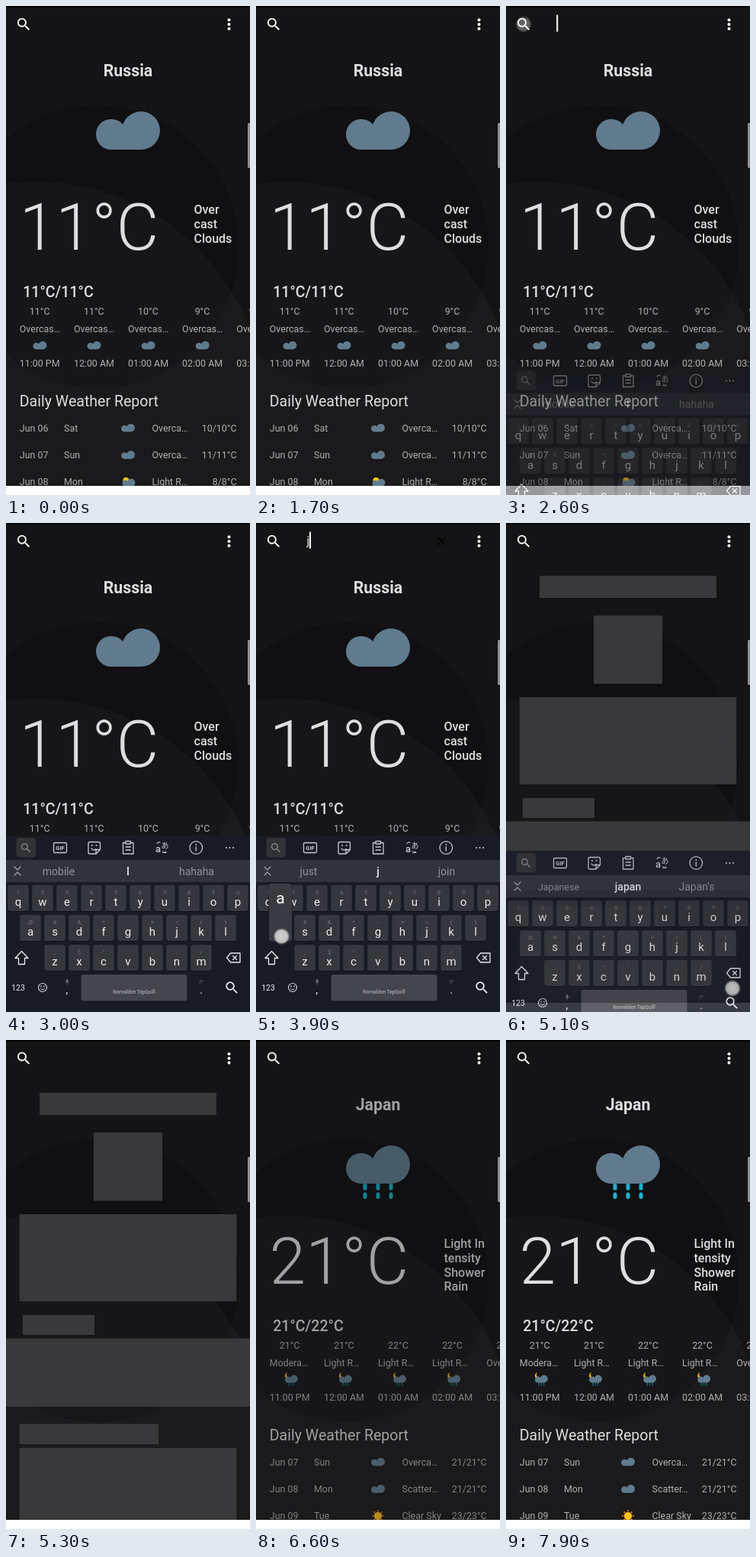
An HTML page that plays this animation: 320x640 px, repeating every 8000 ms.

```html
<!DOCTYPE html>
<html lang="en">
<head>
<meta charset="utf-8">
<title>Weather search</title>
<style>
  html, body { margin: 0; width: 100%; height: 100%; overflow: hidden; background: #141316; }
  svg { display: block; width: 320px; height: 640px; font-family: Roboto, "Noto Sans CJK JP", sans-serif; }
  text { white-space: pre; }
</style>
</head>
<body>
<svg id="stage" viewBox="0 0 320 640"></svg>
<script>
const LOOP = 8000, STEP = 100;
const stage = document.getElementById('stage');

// Markup helpers
const text = (x, y, s, size, fill, weight = 400, anchor = 'start', extra = '') =>
  `<text x="${x}" y="${y}" font-size="${size}" fill="${fill}" font-weight="${weight}" text-anchor="${anchor}" ${extra}>${s}</text>`;
const rect = (x, y, w, h, fill, r = 0) =>
  `<rect x="${x}" y="${y}" width="${w}" height="${h}" rx="${r}" fill="${fill}"/>`;
const circle = (x, y, r, fill, extra = '') => `<circle cx="${x}" cy="${y}" r="${r}" fill="${fill}" ${extra}/>`;
const line = (d, color, width = 1.3) =>
  `<path d="${d}" fill="none" stroke="${color}" stroke-width="${width}" stroke-linecap="round" stroke-linejoin="round"/>`;
const group = (id, body, extra = '') => `<g id="${id}" ${extra}>${body}</g>`;
const place = (x, y, s, body) => `<g transform="translate(${x} ${y}) scale(${s})">${body}</g>`;

// Weather icons, drawn around their centre at large size
const cloudShape = circle(-22, 5, 20, '#607b8d') + circle(17, 0, 25, '#607b8d') + rect(-22, -7, 39, 32, '#607b8d');
const drops = [-17, 0, 17].map(x =>
  rect(x - 2.5, 25, 5, 8.5, '#18b0ca', 1.5) + rect(x - 2.5, 36.5, 5, 8.5, '#18b0ca', 2.2)).join('');
const moonShape = '<path d="M-26-42a22 22 0 1 0 22 36a22 22 0 0 1-22-36z" fill="#fdb813"/>';
const rays = Array.from({ length: 8 }, (_, i) =>
  `<path d="M-7-28L0-41L7-28z" fill="#f4751f" transform="rotate(${i * 45})"/>`).join('');
const icons = {
  cloud: (x, y) => place(x, y, 0.214, cloudShape),
  nightRain: (x, y) => place(x + 2, y - 0.5, 0.2, moonShape + cloudShape + drops),
  sunRain: (x, y) => place(x + 1, y + 1, 0.2, circle(-18, -14, 20, '#fdc51b') + cloudShape + drops),
  sun: (x, y) => place(x, y, 0.205, rays + circle(0, 0, 25, '#fdc51b'))
};

const searchIcon = (x, y, s, fill) => place(x, y, s,
  `<path transform="translate(-11.75 -11.75)" fill="${fill}" d="M15.5 14h-.79l-.28-.27A6.47 6.47 0 0 0 16 9.5 6.5 6.5 0 1 0 9.5 16c1.61 0 3.09-.59 4.23-1.57l.27.28v.79l5 4.99L20.49 19l-4.99-5zm-6 0C7.01 14 5 11.99 5 9.5S7.01 5 9.5 5 14 7.01 14 9.5 11.99 14 9.5 14z"/>`);

function page(id, p) {
  const soft = '#b0b0b2', bright = '#dedee0', small = 12.44;
  let out = text(160, 92, p.name, 21.33, bright, 700, 'middle');
  out += place(160, 163, 1, cloudShape + (p.rain ? drops : ''));
  out += text(17.8, 318.5, p.temp, 85.33, bright, 300);
  p.sky.forEach((s, i) => out += text(246.5, 272 + i * 18.75, s, 16, bright, 500));
  out += text(22.2, 380.5, p.range, 19.56, bright, 500);
  p.hours.forEach(([temp, sky, time], i) => {
    const x = 17.8 + i * 71.1;
    out += text(x + 26.4, 404, temp, small, soft, 400, 'middle') + text(x, 426.5, sky, small, soft)
      + icons[p.hourIcon](x + 26.6, 444) + text(x, 472, time, small, soft);
  });
  out += text(17.8, 523.5, 'Daily Weather Report', 19.56, bright);
  p.days.forEach(([date, day, icon, sky, temp], i) => {
    const y = 556.5 + i * 35.4;
    out += text(17.8, y, date, small, soft) + text(76, y, day, small, soft) + icons[icon](160, y - 4.5)
      + text(191.5, y, sky, small, soft) + text(302.5, y, temp, small, soft, 400, 'end');
  });
  return group(id, out);
}

const times = ['11:00 PM', '12:00 AM', '01:00 AM', '02:00 AM', '03:00 AM'];
const hours = (temps, skies) => times.map((time, i) => [temps[i] + '°C', skies[i], time]);

const russia = {
  name: 'Russia', temp: '11°C', range: '11°C/11°C', sky: ['Over', 'cast', 'Clouds'], hourIcon: 'cloud',
  hours: hours([11, 11, 10, 9, 9], Array(5).fill('Overcas…')),
  days: [['Jun 06', 'Sat', 'cloud', 'Overca…', '10/10°C'],
         ['Jun 07', 'Sun', 'cloud', 'Overca…', '11/11°C'],
         ['Jun 08', 'Mon', 'sunRain', 'Light R…', '8/8°C']]
};
const japan = {
  name: 'Japan', temp: '21°C', range: '21°C/22°C', sky: ['Light In', 'tensity', 'Shower', 'Rain'],
  rain: true, hourIcon: 'nightRain',
  hours: hours([21, 21, 22, 22, 22], ['Modera…', 'Light R…', 'Light R…', 'Light R…', 'Overcas…']),
  days: [['Jun 07', 'Sun', 'cloud', 'Overca…', '21/21°C'],
         ['Jun 08', 'Mon', 'cloud', 'Scatter…', '21/21°C'],
         ['Jun 09', 'Tue', 'sun', 'Clear Sky', '23/23°C']]
};

const skeleton = [[44, 69, 232, 29], [115, 121, 90, 89.5], [17.8, 228, 284.5, 114], [22, 360, 94, 26],
  [0, 390.5, 320, 89.5], [17.8, 502.5, 182.4, 26.5], [17.8, 534, 284.5, 95]]
  .map(r => rect(...r, '#39383a')).join('');

// Keyboard
const keyPos = {};
function keyboard() {
  const white = '#ececee', dim = '#707278', ink = '#c6c8cc';
  let out = rect(0, 409, 320, 400, '#181b24') + rect(0, 441, 320, 29, '#30333b');

  out += rect(13.5, 412, 25.5, 25.5, '#303236', 4) + searchIcon(26, 425, 0.7, '#85878b');
  out += line('M64 418.5h14a1.5 1.5 0 0 1 1.5 1.5v10a1.5 1.5 0 0 1-1.5 1.5h-14a1.5 1.5 0 0 1-1.5-1.5v-10a1.5 1.5 0 0 1 1.5-1.5z', ink)
    + text(71, 428, 'GIF', 7.5, ink, 700, 'middle');
  out += line('M110 417.5h11.5a2 2 0 0 1 2 2v8l-5.5 5.5h-8a2 2 0 0 1-2-2v-11.5a2 2 0 0 1 2-2zM118 433v-3.500a2 2 0 0 1 2-2h3.500M112 426q3.500 4 6 .5', ink)
    + circle(113, 422, 1, ink) + circle(118.5, 422, 1, ink);
  out += line('M156 418.500h-2.500v14.500h13.500v-14.500h-2.500M157 416.500h6.500v3.500h-6.500zM157 424h6.500M157 428h6.500', ink);
  out += text(199.500, 431, 'a', 13, ink, 500, 'middle') + text(208.500, 426, 'あ', 10, ink, 500, 'middle')
    + line('M198 419.500q1-2 4-1.500M206 431.500h4l-1.500-1.500M206 429.500v2', ink, 1.1);
  out += `<circle cx="249.300" cy="425" r="8.300" fill="none" stroke="${ink}" stroke-width="1.300"/>`
    + line('M249.300 424v5', ink, 1.4) + circle(249.3, 421, 1, ink);
  out += [289, 293.5, 298].map(x => circle(x, 425, 1.1, ink)).join('');

  out += line('M11 450l4 4l4-4M11 461l4-4l4 4', '#a0a2a7', 1.2);
  out += group('hints', [69, 160, 250].map((x, i) =>
    text(x, 460.5, '', 14, i === 1 ? white : '#8f9196', i === 1 ? 500 : 400, 'middle')).join(''));

  [['qwertyuiop', '1234567890', 16], ['asdfghjkl', '@#&*-+=()', 32], ['zxcvbnm', '_$"\':;/', 64]]
    .forEach(([letters, marks, x0], row) => {
      const y = 474 + row * 39;
      [...letters].forEach((c, i) => {
        const x = x0 + i * 32;
        keyPos[c] = [x, y];
        out += rect(x - 13.8, y + 1, 27.6, 34, '#0e1016', 3) + rect(x - 13.8, y, 27.6, 34, '#36373d', 3)
          + text(x, y + 11.5, marks[i].replace('&', '&amp;'), 8, dim, 400, 'middle')
          + text(x, y + 27, c, 15, white, 400, 'middle');
      });
    });
  out += line('M20.500 560.500l8.500 9h-4.500v8h-8v-8h-4.500z', white, 1.3);
  out += line('M294.500 563h12.500v12h-12.500l-5-6zM297.500 566.500l5 5M302.500 566.500l-5 5', white, 1.3);

  out += text(16, 612, '123', 10.5, white, 400, 'middle');
  out += '<circle cx="48" cy="608" r="5.500" fill="none" stroke="#d0d1d4" stroke-width="1.200"/>'
    + circle(46, 606.5, 0.9, '#d0d1d4') + circle(50, 606.5, 0.9, '#d0d1d4') + line('M45.500 609.500q2.500 3 5 0', '#d0d1d4', 1);
  out += rect(79, 597, 2.4, 4.5, dim, 1.2) + line('M77.800 600.500q2.400 4 4.800 0M80.200 602.500v2', dim, 0.7)
    + text(80, 616, ',', 14, white, 400, 'middle');
  out += rect(98.5, 592, 139, 34.500, '#0e1016', 3) + rect(98.5, 591, 139, 34.500, '#45464c', 3)
    + text(168, 615.5, 'Norvalden TapQuill', 6.5, '#9a9ba0', 700, 'middle');
  out += text(256, 603, '!?', 7, dim, 400, 'middle') + text(256, 616, '.', 14, white, 400, 'middle')
    + searchIcon(296, 608, 0.88, white);
  out += group('popup', rect(-15.5, -41.5, 31, 77, '#14161c', 4) + rect(-15, -41, 30, 75.5, '#3a3b41', 4)
    + text(0, -15, '', 21, '#fff', 400, 'middle'));
  return out;
}

stage.innerHTML = `<defs><radialGradient id="glow">
    <stop offset="0" stop-color="#e4e4e4"/><stop offset=".72" stop-color="#cfcfcf"/>
    <stop offset="1" stop-color="#bbb" stop-opacity="0"/></radialGradient></defs>`
  + rect(0, 0, 320, 640, '#141316')
  + circle(120, 315, 185, '#100f12')
  + circle(40, 530, 300, '#fff', 'opacity=".025"')
  + rect(0, 0, 320, 2, '#000')
  + page('russia', russia) + page('japan', japan) + group('skeleton', skeleton)
  + rect(0, 628, 320, 12, '#fff')
  + rect(317, 153, 5, 59, '#8f8e91', 1.5)
  + [18.2, 24, 29.8].map(y => circle(292.5, y, 2, '#fff')).join('')
  + group('field', text(66.5, 28.5, '', 16, '#e2e2e4', 400, 'start', 'id="query" text-decoration="underline"')
    + group('clear', line('M238 18l11 11M249 18l-11 11', '#050506', 1.6))
    + '<rect id="caret" y="11.500" width="2" height="22" fill="#fff"/>')
  + group('keys', keyboard())
  + circle(0, 0, 11, 'url(#glow)', 'id="touch"')
  + searchIcon(23, 23.8, 0.92, '#fff');

const el = id => document.getElementById(id);
const show = (id, on) => { el(id).style.display = on ? '' : 'none'; };
const move = (id, x, y) => el(id).setAttribute('transform', `translate(${x} ${y})`);

// Timelines: [time, ...values]
const slide = [[2500, 150, 0], [2600, 65.5, 0.45], [2700, 20, 0.85], [2800, 0, 1], [5000, 0, 1], [5100, 20, 0.85], [5200, 100, 0.35], [5300, 170, 0]];
const typed = [[0, 0], [3800, 1], [4000, 2], [4200, 3], [4300, 4], [4500, 5]];
const presses = [[3700, 3900, 'j'], [3900, 4100, 'a'], [4100, 4200, 'p'], [4200, 4400, 'a'], [4400, 4700, 'n']];
const words = [['mobile', 'I', 'hahaha'], ['just', 'j', 'join'], ['jar', 'ja', 'jam'], ['Japan', 'jap', 'Japanese'],
  ['Japanese', 'japan', 'kapa'], ['Japanese', 'japan', "Japan's"]];

const within = (t, a, b) => t >= a && t < b;
const last = (steps, t) => steps.filter(s => s[0] <= t).pop();
function blend(keys, t) {
  const i = keys.findIndex(k => k[0] > t);
  if (i < 1) return keys[i ? keys.length - 1 : 0].slice(1);
  const a = keys[i - 1], b = keys[i], f = (t - a[0]) / (b[0] - a[0]);
  return a.slice(1).map((v, n) => v + (b[n + 1] - v) * f);
}

function draw(t) {
  show('russia', t < 5100);
  show('skeleton', within(t, 5100, 6600));
  show('japan', t >= 6600);
  el('japan').style.opacity = blend([[6600, 0.7], [7200, 1]], t)[0];

  const [shift, alpha] = blend(slide, t);
  show('keys', alpha > 0);
  move('keys', 0, shift);
  el('keys').style.opacity = alpha;

  const count = last(typed, t)[1];
  const query = el('query');
  show('field', within(t, 2500, 5100));
  show('clear', count > 0);
  query.textContent = 'japan'.slice(0, count);
  show('caret', !within(t, 3000, 3500) && t < 5000);
  el('caret').setAttribute('x', 66.2 + (count ? query.getComputedTextLength() : 0));

  const row = words[t < 4600 ? Math.min(count, 4) : count];
  [...el('hints').children].forEach((node, i) => {
    node.textContent = row[i];
    node.setAttribute('font-size', row[i].length > 7 ? 12.5 : 14);
  });

  const press = presses.find(p => within(t, p[0], p[1]));
  let touch = null;
  show('popup', press);
  if (press) {
    const [x, y] = keyPos[press[2]];
    move('popup', x, y);
    el('popup').lastChild.textContent = press[2];
    if (t < press[0] + 200) touch = [x + 1.5, y + 28, 0.9];
  }
  if (within(t, 2500, 2700)) touch = [23, 23.8, 0.4];
  if (within(t, 5000, 5200)) touch = [297, 609, 0.8];
  show('touch', touch);
  if (touch) {
    move('touch', touch[0], touch[1]);
    el('touch').style.opacity = touch[2];
  }
}

const start = performance.now();
function tick() {
  const t = (performance.now() - start) % LOOP;
  draw(Math.floor(t / STEP) * STEP);
  requestAnimationFrame(tick);
}
tick();
</script>
</body>
</html>
```
